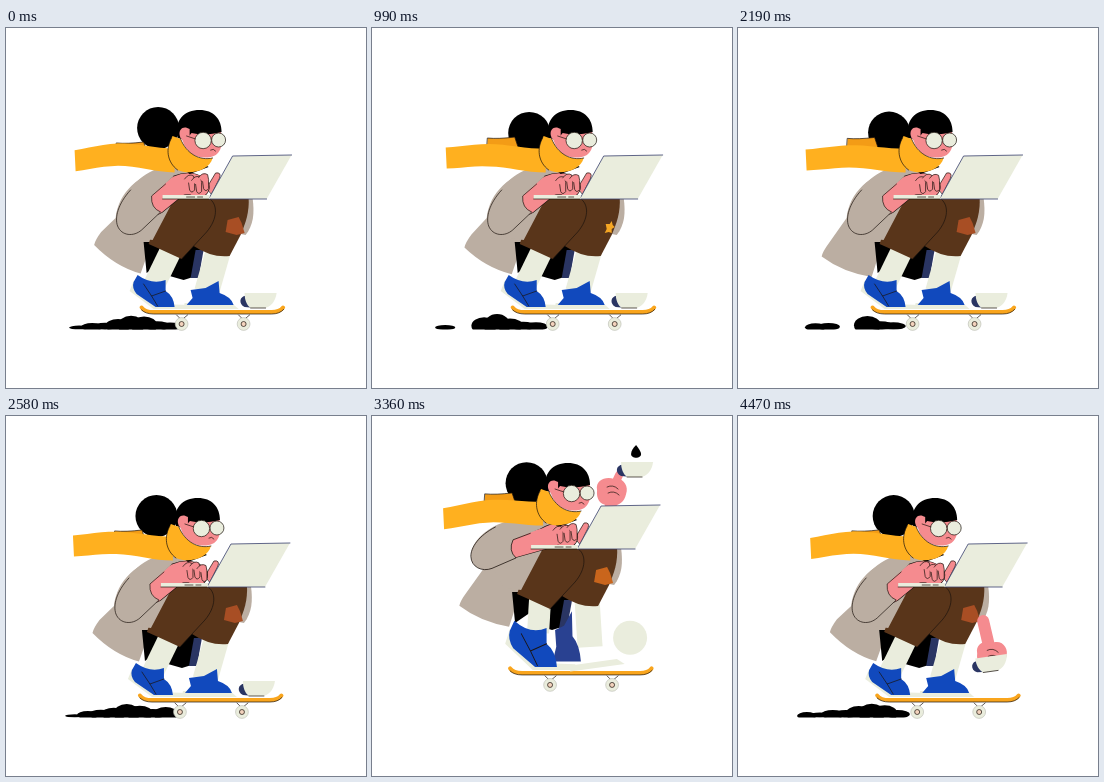
These frames come from a looping animation (360 by 360 pixels, 4.5 s). An HTML page:

```html
<!DOCTYPE html>
<html lang="en">
<head>
<meta charset="utf-8">
<title>Skateboard laptop ride</title>
<style>
html, body { margin: 0; width: 100%; height: 100%; overflow: hidden; background: #fff; }
svg { display: block; width: 100vw; height: 100vh; }
path { stroke-linejoin: round; stroke-linecap: round; }
.ln { stroke: #1c130e; stroke-width: .7; }
.no { fill: none; }
.skin { fill: #f58b8f; }
.white { fill: #eaeddd; }
.gold { fill: #ffb01f; }
.coat { fill: #bbaea2; }
.brown { fill: #59351a; }
.navy { fill: #2a3563; }
.sock { fill: none; stroke: #eaeddd; stroke-linecap: butt; }
.wheel { fill: #eaeddd; stroke: #b9bab2; stroke-width: .6; }
.limb { fill: none; stroke: #f58b8f; }
</style>
</head>
<body>
<svg viewBox="0 0 360 360">
  <defs><clipPath id="ground"><rect y="250" width="360" height="51.5"/></clipPath></defs>
  <g id="dust" clip-path="url(#ground)"></g>
  <g id="rider">
    <ellipse id="saucer" class="white" rx="17"/>
    <g id="back">
      <path id="coat" class="coat"/>
      <path d="M138 214H196L194 247L178 252L164 248L157 234L141 245Z"/>
      <path class="navy" d="M190 222H198L193 250H185Z"/>
    </g>
    <g id="board">
      <path class="no ln" d="M171 287L176 292L182 287M233 287L238 292L244 287"/>
      <g class="wheel"><circle cx="176" cy="296" r="6.4"/><circle cx="238" cy="296" r="6.4"/></g>
      <g fill="#f3d3bd" class="ln"><circle cx="176" cy="296" r="2.500"/><circle cx="238" cy="296" r="2.500"/></g>
      <path d="M136 279.500Q139 284 148 284H266Q274 284 277.500 279.500" fill="none" stroke="#f9a51d" stroke-width="4"/>
      <path class="no ln" d="M136 282Q140 286 148 286H266Q274 286 278 281.500"/>
    </g>
    <path id="farSock" class="sock" stroke-width="25"/>
    <path id="farSole" class="white" d="M179 275H226L233 281H178Z"/>
    <path id="farShoe" d="M185 262L200 260L213 253L214 265Q226 269 228 277H181L187 270Z"/>
    <path id="nearSock" class="sock" stroke-width="22"/>
    <g id="nearShoe">
      <path class="white" d="M128 253L124 263L148 281H185V277L150 276Z"/>
      <path fill="#1149bd" d="M132 247Q146 257 160 252V263Q168 268 169 279H150L131 266Q126 260 128 254Z"/>
      <path class="no ln" d="M138 256L146 268L160 263M146 268L152 278"/>
    </g>
    <g id="legs">
      <path class="coat" d="M234 168L247 170C249 185 248 197 240 207L230 205Z"/>
      <path class="brown" d="M185 169H243C244 184 240 195 235 207L224 228Q206 230 188 218Z"/>
      <path class="brown" d="M143 216C148 200 156 183 168 169H202C213 175 212 191 201 204L176 231L152 220Z"/>
      <path class="no ln" d="M203 170C213 176 212 191 201 204L176 231"/>
      <path id="patch"/>
    </g>
    <g id="reach">
      <path id="arm" class="limb" stroke-width="12"/>
      <path id="finger" class="limb" stroke-width="8"/>
      <g id="fist">
        <path class="skin" d="M-14 -2C-16 -12 -5 -16 3 -13C12 -15 18 -6 15 2C13 12 5 15 -3 13C-11 13 -15 7 -14 -2Z"/>
        <path class="no ln" d="M-4 -5Q2 -8 7 -3M-3 1Q3 -2 8 3"/>
      </g>
    </g>
    <path id="drop" d="M0 -7C3 -3 5 0 5 2C5 7 -5 7 -5 2C-5 -1 -3 -4 0 -7Z"/>
    <g id="cup">
      <path class="navy" d="M-11 -5C-20 -7 -22 3 -15 6L-4 7Z"/>
      <path class="white" d="M-15 -8H17C16 0 11 7 4 7H-9C-13 4 -15 -1 -15 -8Z"/>
      <path class="no ln" d="M-9 7H6"/>
    </g>
    <circle id="bun" cx="152.500" cy="100" r="21"/>
    <g id="scarf">
      <path id="flap" class="ln" fill="#f39c16" d="M111 110Q122 111 138 109L143 124Q122 122 110 124Z"/>
    </g>
    <g id="torso">
      <path class="coat" d="M166 137C140 141 122 158 113 180L130 210L147 212L168 172L190 166L186 142Z"/>
      <path class="skin ln" d="M201 160L210 145Q216 144 214 150L206 166Z"/>
      <path id="armLine" class="no" stroke="#1c130e" stroke-width="22"/>
      <path id="forearm" class="limb" stroke-width="20.800"/>
      <path id="sleeve" class="coat" d="M160 140C125 150 108 178 111 194C113 207 126 210 136 202L155 184Q145 180 146 168L168 148Z"/>
      <path id="seam" class="no ln" d="M125 162C112 176 109 190 112 198C116 208 128 209 136 202L155 184Q145 180 146 168L160 156"/>
    </g>
    <g id="head">
      <path id="tail" class="gold"/>
      <path d="M167 132L184 146L203 139L190 130Z"/>
      <path class="skin" d="M183 103L215 102C218 115 216 127 205 129C190 132 178 123 176 108Z"/>
      <path d="M172 110C168 92 179 82 194 82C208 82 216 91 216 104C205 107 194 107 186 105L180 112Z"/>
      <path class="skin" d="M184 101C178 97 173 101 174 107C175 113 180 114 184 111Z"/>
      <path class="no ln" d="M190 111L181 108M205 122Q208 120 210 123"/>
      <g class="white ln"><circle cx="213" cy="112" r="7"/><circle cx="197.500" cy="112.500" r="8.200"/></g>
      <path class="gold" d="M167 108C160 120 160 135 172 142C185 148 204 142 207 130C194 133 181 126 175 111Z"/>
      <path class="no ln" d="M166 110C160 120 161 134 172 142M175 111C181 126 194 133 207 130"/>
    </g>
    <g id="laptop">
      <path class="white" d="M227 128L286 127L261 171H203Z"/>
      <path class="no" stroke="#39406e" stroke-width=".8" d="M286 127L227 128L203 171H261"/>
      <path class="white" d="M157 167H204V171H157Z"/>
      <path class="no ln" d="M157 171H203M181 169H189M192 169H197"/>
      <g id="fingers"></g>
    </g>
  </g>
</svg>
<script>
const LOOP = 4500, TAU = Math.PI * 2;
const el = {};
document.querySelectorAll('[id]').forEach(n => el[n.id] = n);
const set = (id, k, v) => el[id].setAttribute(k, v);
const move = (id, x, y, more = '') => set(id, 'transform', `translate(${x} ${y}) ${more}`);
const show = (id, on) => set(id, 'visibility', on ? 'visible' : 'hidden');
const line = (id, x1, y1, x2, y2) => set(id, 'd', `M${x1} ${y1}L${x2} ${y2}`);
const lerp = (a, b, m) => a + (b - a) * m;
const clamp = v => Math.max(0, Math.min(1, v));
const ease = (t, a, b) => { const p = clamp((t - a) / (b - a)); return p * p * (3 - 2 * p); };
const arc = (t, a, b) => Math.max(0, 4 * (t - a) * (b - t) / (b - a) ** 2);
const wave = (t, n, shift = 0) => Math.cos(TAU * (t * n / LOOP - shift));
const rnd = i => { const v = Math.sin(i * 127.1 + 3.7) * 43758.545; return v - Math.floor(v); };
const scaleAt = (x, y, sx, sy) => `translate(${x} ${y}) scale(${sx} ${sy}) translate(${-x} ${-y})`;

// dust rolls back from the rear wheel, with pauses
const STEP = 45, LIFE = 340;
const pauses = [[680, 800], [1975, 2030], [3045, 3500]];
const puffs = [];
for (let born = 0; born < LOOP; born += STEP) {
  if (pauses.some(([a, b]) => born > a && born < b)) continue;
  const node = document.createElementNS('http://www.w3.org/2000/svg', 'ellipse');
  el.dust.append(node);
  puffs.push({ node, born, tall: 5 + 8 * rnd(born) });
}

function drawDust(t) {
  for (const { node, born, tall } of puffs) {
    const p = (t - born + LOOP) % LOOP / LIFE;
    const size = p < 1 ? Math.min(1, .65 + p) * (1 - p * p * .75) : 0;
    node.setAttribute('cx', 164 - 98 * p);
    node.setAttribute('cy', 301 - 4 * size);
    node.setAttribute('rx', size && 8 + 6 * size);
    node.setAttribute('ry', tall * size);
  }
}

function drawTail(t, lag) {
  const top = [], low = [];
  for (let s = 0; s <= 1.001; s += 1 / 14) {
    const x = 169 - 101 * s, half = 12 - 1.5 * s;
    const y = 130 + 2.5 * Math.cos(TAU * s * .9) + s * (2 * wave(t, 3, .2 + .4 * (1 - s)) + lag);
    top.push(`${x + s} ${y - half}`);
    low.unshift(`${x + 2 * s} ${y + half}`);
  }
  set('tail', 'd', `M${top.concat(low).join('L')}Z`);
}

function drawPatch(t) {
  const small = t >= 720 && t < 1950, hot = t > 3150 && t < 3650;
  set('patch', 'd', small
    ? 'M229 196h4l2 -3l1 4l2 2l-3 2v4l-3 -1l-4 1l2 -4Z'
    : 'M222 192L233 189L236 195L239 205L231 207L220 204Z');
  set('patch', 'fill', small ? '#f5a623' : hot ? '#c9651c' : '#a84e24');
}

// the far hand grabs the cup, lifts it in the jump and puts it back
function drawCup(t, by) {
  const lift = ease(t, 3040, 3210);
  const cx = 254 + 8 * lift - 12 * ease(t, 3480, 4470);
  const cy = 273 - 219 * lift + 96 * ease(t, 3480, 3760) + 100 * ease(t, 4230, 4490);
  const up = clamp((200 - cy) / 120), grab = ease(t, 2990, 3050);
  const hx = lerp(243, cx - 25 * up, grab), hy = lerp(175 + by, cy + lerp(-9, 22, up), grab);
  move('cup', cx, cy, `rotate(${-8 * ease(t, 4000, 4200)})`);
  move('fist', hx, hy);
  line('arm', lerp(242, 236, up), lerp(205, 160, up) + by, hx, hy);
  line('finger', hx, hy, lerp(hx, cx - 17, up), lerp(hy, cy + 5, up));
  show('reach', t > 2990);
  show('drop', t > 3170 && t < 3500);
  move('drop', cx, 48 - 12 * Math.min(1, 1.25 * arc(t, 3150, 3520)));
}

function drawFeet(air, by, jy) {
  move('nearShoe', 14 * air, jy, scaleAt(170, 281, 1 + .15 * air, 1 + .45 * air));
  move('farShoe', -2 * air, jy, scaleAt(180, 281, 1 - .4 * air, 1 + 1.1 * air));
  move('farSole', 18 * air, jy, `rotate(${-8 * air} 190 281)`);
  set('farShoe', 'fill', `rgb(${17 + 24 * air},${73 - 8 * air},${189 - 44 * air})`);
  line('nearSock', 166, 221 + by, 149 + 15 * air, 256 + jy - 12 * air);
  line('farSock', 213, 222 + by, 201 + 15 * air, 264 + jy - 6 * air);
}

function drawArm(t, air) {
  const turn = `rotate(${20 * air} 160 145)`;
  set('sleeve', 'transform', turn);
  set('seam', 'transform', turn);
  const d = `M${150 - 10 * air} ${176 - 7 * air}L172 ${158 + 2 * air}Q184 153 193 159`;
  set('armLine', 'd', d);
  set('forearm', 'd', d);
  el.fingers.innerHTML = [0, 1, 2].map(i => {
    const x = 183 + i * 7, y = 151 + 1.6 * Math.sin(t / 48 + i * 2.1);
    return `<path class="skin ln" d="M${x - 4} ${y}q4 -6 9 -3l1 5v9q-3 4 -5 0l-1 -7"/>`;
  }).join('');
}

function drawCoat(t) {
  const f = 8 * wave(t, 3, .36), x = 87 - f * .3, y = 222 + f;
  set('coat', 'd', `M165 140C132 145 113 165 110 190L${x + 7} ${y - 13}Q${x + 1} ${y - 5} ${x} ${y}`
    + `Q${x + 21} ${241 + f * .5} 135 ${247 + f * .3}L147 212L200 175Z`);
}

function draw(t) {
  const sway = 1.3 + 3.4 * Math.cos(TAU * (t - 1000) / 3000);
  // crouch, leap, landing, recovery
  const by = 20 * ease(t, 2640, 2900) - 58 * ease(t, 3010, 3210) + 50 * ease(t, 3390, 3580) - 12 * ease(t, 3660, 3880);
  const jy = -28 * arc(t, 3100, 3540);
  const air = ease(t, 3080, 3220) - ease(t, 3400, 3540);
  const hy = by * .92, bob = 2.5 * (1 - wave(t, 7));
  const float = arc(t, 3080, 3540);

  move('rider', sway, 0);
  move('board', 0, jy);
  for (const id of ['torso', 'laptop', 'back']) move(id, 0, by);
  for (const id of ['head', 'scarf']) move(id, 0, hy);
  move('legs', 0, by, scaleAt(190, 170, 1 + Math.max(0, by) * .006, 1));
  move('bun', 0, hy + bob);
  move('flap', 0, 5 - bob);
  show('saucer', float > 0);
  set('saucer', 'cx', 256);
  set('saucer', 'cy', 277 - 58 * float);
  set('saucer', 'ry', 2 + 15 * Math.min(1, float * 1.2));

  drawFeet(air, by, jy);
  drawCoat(t);
  drawArm(t, air);
  drawTail(t, -by * .1);
  drawPatch(t);
  drawCup(t, by);
  drawDust(t);
}

const start = performance.now();
function frame() {
  const t = (performance.now() - start) % LOOP;
  draw(Math.floor(t / 30) * 30);
  requestAnimationFrame(frame);
}
frame();
</script>
</body>
</html>
```
